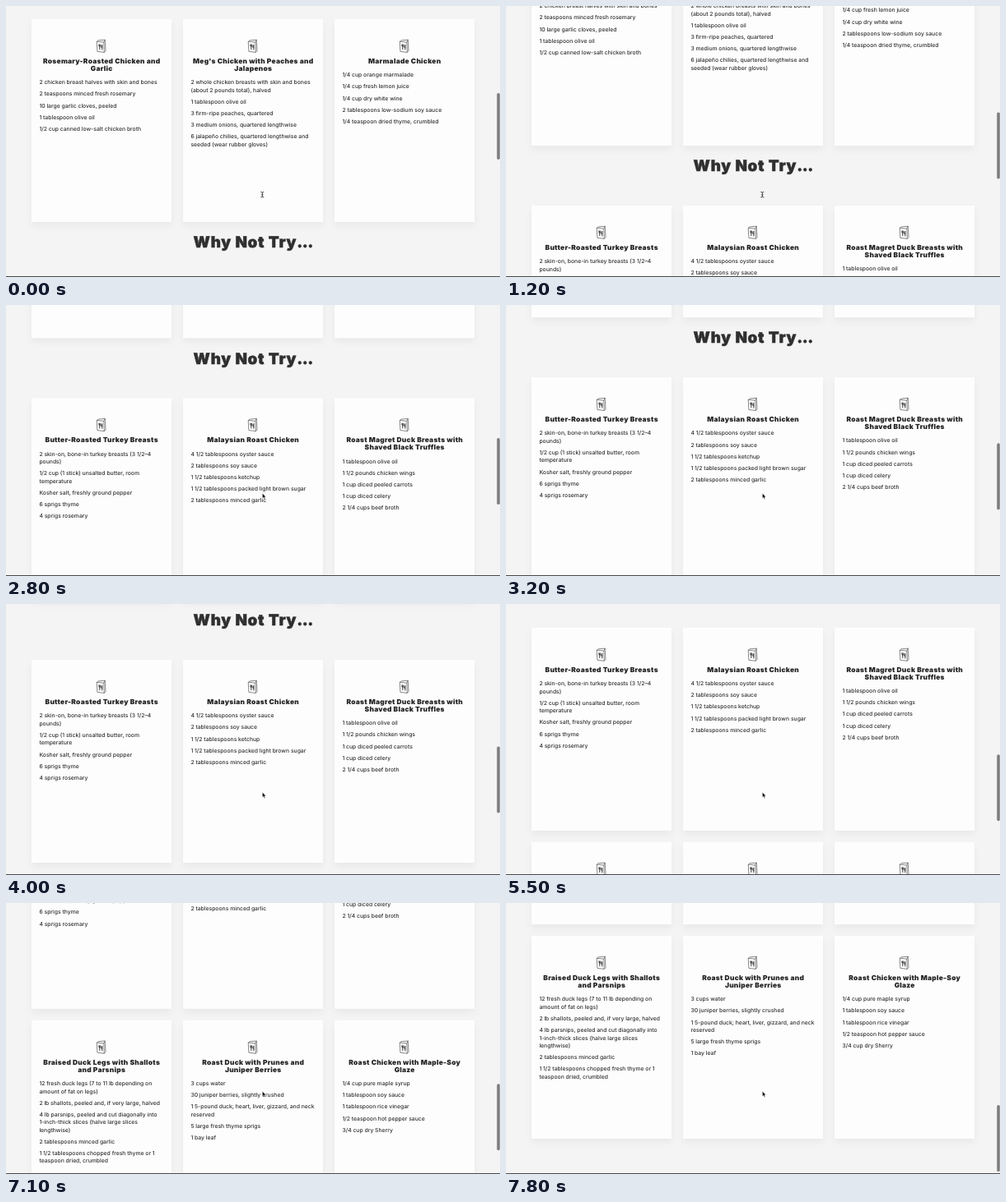
An HTML page that plays this animation: 600x330 px, repeating every 7900 ms.

```html
<!DOCTYPE html>
<html lang="en">
<head>
<meta charset="utf-8">
<title>Recipes</title>
<style>
  html, body { margin: 0; width: 100%; height: 100%; overflow: hidden; background: #f4f4f4; }
  svg { display: block; width: 600px; height: 330px; }
  text { font-family: Inter, "Open Sans", sans-serif; white-space: pre; text-rendering: geometricPrecision; }
  .item { font-size: 6.8px; font-weight: 500; fill: #2f2f2f; }
  .title { font-size: 8.4px; font-weight: 900; letter-spacing: .27px; fill: #222; text-anchor: middle; }
  .head { font-size: 18.8px; font-weight: 900; letter-spacing: .75px; text-anchor: middle;
    fill: #2f2f2f; stroke: #2f2f2f; stroke-width: .45px; }
  .dots { letter-spacing: -.5px; }
  .card { fill: #fdfdfd; filter: drop-shadow(0 5px 4px rgba(0, 0, 0, .045)); }
  .icon { fill: none; stroke: #4a4a4a; stroke-width: .65; stroke-linejoin: round; stroke-linecap: round; }
  .cutlery { stroke: #333; stroke-width: .95; }
</style>
</head>
<body>
<svg viewBox="0 0 600 330" xmlns="http://www.w3.org/2000/svg">
  <rect width="600" height="330" fill="#f4f4f4"/>
  <g id="page"></g>
  <rect id="bar" x="596.3" width="3.5" height="81" rx="1.7" fill="#7c7c7c"/>
  <rect y="329" width="600" height="1" fill="#484848"/>
  <path id="beam" d="M309.7 226.4q1.6 0 1.6 1v4.6q0 1-1.6 1m3.2-6.6q-1.6 0-1.6 1m0 4.6q0 1 1.6 1m-2.3-3.1h1.4"
    fill="none" stroke="#222" stroke-width=".8" stroke-linecap="round"/>
  <path id="arrow" d="M311.4 229.3v6.2l1.4-1.3 1 2.4 1.1-.5-1-2.3h1.9z" fill="#111" stroke="#fff" stroke-width=".45"/>
</svg>
<script>
const NS = "http://www.w3.org/2000/svg";
const $ = id => document.getElementById(id);

function add(parent, tag, attrs, text) {
  const el = document.createElementNS(NS, tag);
  for (const k in attrs) el.setAttribute(k, attrs[k]);
  if (text) el.textContent = text;
  parent.appendChild(el);
  return el;
}

// "|" marks a line break inside a title or an ingredient
const rows = [
  { y: 16, cards: [
    ["Rosemary-Roasted Chicken and|Garlic",
      "2 chicken breast halves with skin and bones",
      "2 teaspoons minced fresh rosemary",
      "10 large garlic cloves, peeled",
      "1 tablespoon olive oil",
      "1/2 cup canned low-salt chicken broth"],
    ["Meg's Chicken with Peaches and|Jalapenos",
      "2 whole chicken breasts with skin and bones|(about 2 pounds total), halved",
      "1 tablespoon olive oil",
      "3 firm-ripe peaches, quartered",
      "3 medium onions, quartered lengthwise",
      "6 jalapeño chilies, quartered lengthwise and|seeded (wear rubber gloves)"],
    ["Marmalade Chicken",
      "1/4 cup orange marmalade",
      "1/4 cup fresh lemon juice",
      "1/4 cup dry white wine",
      "2 tablespoons low-sodium soy sauce",
      "1/4 teaspoon dried thyme, crumbled"]
  ] },
  { y: 336, cards: [
    ["Butter-Roasted Turkey Breasts",
      "2 skin-on, bone-in turkey breasts (3 1/2–4|pounds)",
      "1/2 cup (1 stick) unsalted butter, room|temperature",
      "Kosher salt, freshly ground pepper",
      "6 sprigs thyme",
      "4 sprigs rosemary"],
    ["Malaysian Roast Chicken",
      "4 1/2 tablespoons oyster sauce",
      "2 tablespoons soy sauce",
      "1 1/2 tablespoons ketchup",
      "1 1/2 tablespoons packed light brown sugar",
      "2 tablespoons minced garlic"],
    ["Roast Magret Duck Breasts with|Shaved Black Truffles",
      "1 tablespoon olive oil",
      "1 1/2 pounds chicken wings",
      "1 cup diced peeled carrots",
      "1 cup diced celery",
      "2 1/4 cups beef broth"]
  ] },
  { y: 597, cards: [
    ["Braised Duck Legs with Shallots|and Parsnips",
      "12 fresh duck legs (7 to 11 lb depending on|amount of fat on legs)",
      "2 lb shallots, peeled and, if very large, halved",
      "4 lb parsnips, peeled and cut diagonally into|1-inch-thick slices (halve large slices|lengthwise)",
      "2 tablespoons minced garlic",
      "1 1/2 tablespoons chopped fresh thyme or 1|teaspoon dried, crumbled"],
    ["Roast Duck with Prunes and|Juniper Berries",
      "3 cups water",
      "30 juniper berries, slightly crushed",
      "1 5-pound duck; heart, liver, gizzard, and neck|reserved",
      "5 large fresh thyme sprigs",
      "1 bay leaf"],
    ["Roast Chicken with Maple-Soy|Glaze",
      "1/4 cup pure maple syrup",
      "1 tablespoon soy sauce",
      "1 tablespoon rice vinegar",
      "1/2 teaspoon hot pepper sauce",
      "3/4 cup dry Sherry"]
  ] }
];

const booklet = "M-5 2.2L3.2 3.2 3.7 15.4-4.3 14.4zM-5 2.2L-3.6.9 4.6.2 5.4 13.6 3.7 15.4M3.2 3.2L4.6.2";
const cutlery = "M-2.7 6v1.5q0 .9 .9 .9t.9-.9V6.1M-1.8 6v5.7M1.2 12v-5.7q-1.1 1-1 3h1";

function drawCard(page, x, y, [title, ...items]) {
  const g = add(page, "g", { transform: `translate(${x} ${y})` });
  add(g, "rect", { class: "card", width: 170, height: 247 });
  const icon = add(g, "g", { class: "icon", transform: "translate(84.6 25)" });
  add(icon, "path", { d: booklet });
  add(icon, "path", { class: "cutlery", d: cutlery });
  const titleLines = title.split("|");
  titleLines.forEach((s, i) => add(g, "text", { class: "title", x: 85.2, y: 53.9 + 9 * i }, s));
  let base = 61.3 + 9 * titleLines.length;
  for (const item of items) {
    for (const line of item.split("|")) {
      add(g, "text", { class: "item", x: 9.4, y: base }, line);
      base += 9.45;
    }
    base += 4.7;
  }
}

const page = $("page");
for (const { y, cards } of rows) cards.forEach((c, i) => drawCard(page, 31 + 184 * i, y, c));
const head = add(page, "text", { class: "head", x: 300.2, y: 294.3 }, "Why Not Try");
add(head, "tspan", { class: "dots" }, "...");

// each swipe: start, duration, from, to, share of time spent speeding up
const swipes = [
  [0, 300, 0, 8, 0],
  [700, 1100, 8, 182.5, .42],
  [2200, 1800, 182.5, 268, .16],
  [5100, 1300, 268, 392, .3],
  [6700, 1100, 392, 557, .35]
];
const LOOP = 7900, STEP = 100;

const glide = (u, a) => u < a ? u * u / a : 1 - (1 - u) ** 2 / (1 - a);

function scrollAt(t) {
  let pos = 0;
  for (const [start, len, from, to, a] of swipes)
    if (t >= start) pos = from + (to - from) * glide(Math.min(1, (t - start) / len), a);
  return pos;
}

function barOpacity(t) {
  if (t === 2300 || t === 4500) return .7;
  if (t === 4600) return .35;
  return t >= 4700 && t < 5200 ? 0 : 1;
}

function draw(ms) {
  const t = Math.floor(ms % LOOP / STEP) * STEP;
  const pos = scrollAt(t);
  page.setAttribute("transform", `translate(0 ${-pos.toFixed(2)})`);
  $("bar").setAttribute("y", (106 + pos * .2515).toFixed(2));
  $("bar").setAttribute("opacity", barOpacity(t));
  $("beam").setAttribute("visibility", t < 1800 ? "visible" : "hidden");
  $("arrow").setAttribute("visibility", t < 1800 ? "hidden" : "visible");
}

const begin = performance.now();
function tick() {
  draw(performance.now() - begin);
  requestAnimationFrame(tick);
}
draw(0);
requestAnimationFrame(tick);
</script>
</body>
</html>
```
